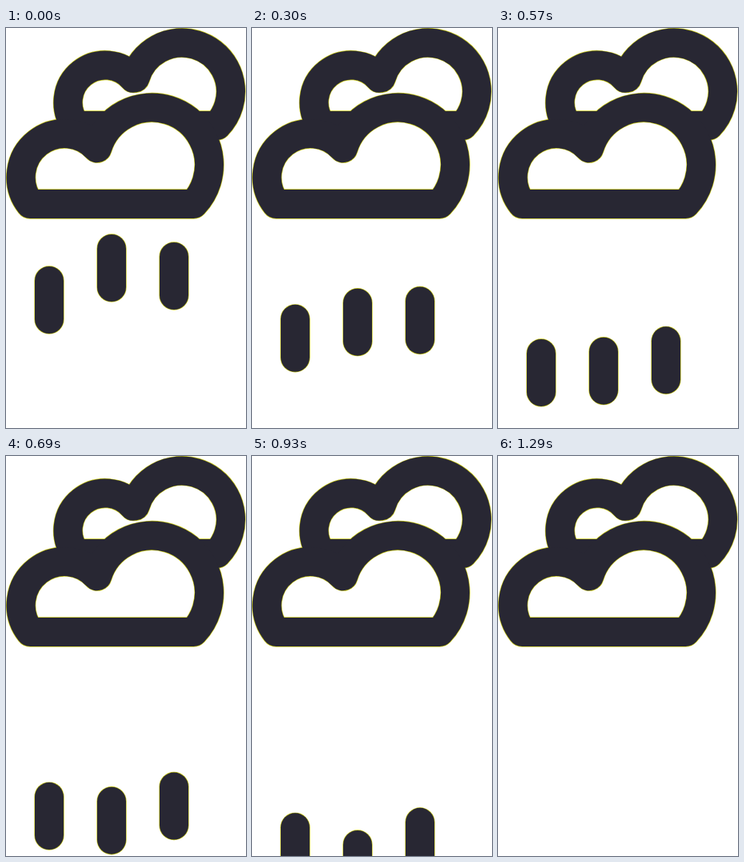
An HTML page with a canvas that plays this animation: 300 px wide and 500 px high, repeating every 1.35 s.

```html
<!DOCTYPE html>
<html>
<head>
<meta charset="utf-8">
<title>Rain clouds</title>
<style>
html, body { margin: 0; width: 100%; height: 100%; overflow: hidden; background: #fff; }
canvas { display: block; }
</style>
</head>
<body>
<canvas id="stage" width="300" height="500"></canvas>
<script>
const ctx = document.getElementById('stage').getContext('2d');
const INK = '#282733', FRINGE = '#c8c814';
const LOOP = 1350, STEP = 30, LAST = 1290;
ctx.lineCap = ctx.lineJoin = 'round';

// Two arcs meeting at a notch, closed by a flat base
function cloud([lx, ly, lr], [rx, ry, rr], [nx, ny], base) {
  const path = new Path2D();
  path.arc(lx, ly, lr, Math.PI - Math.asin((base - ly) / lr), Math.atan2(ny - ly, nx - lx) + 2 * Math.PI);
  path.arc(rx, ry, rr, Math.atan2(ny - ry, nx - rx) + 2 * Math.PI, Math.asin((base - ry) / rr) + 2 * Math.PI);
  path.closePath();
  return path;
}

const back = cloud([124, 93, 46.5], [220, 79.5, 61], [160, 62], 122);
const front = cloud([73.2, 186.5, 54.5], [182.5, 171, 71.5], [114, 150], 220);
const drops = [
  { x: 54, top: 298, speed: 0.1595 },
  { x: 132, top: 258, speed: 0.2257 },
  { x: 210, top: 268, speed: 0.1848 }
];

function outline(path, color, width) {
  ctx.strokeStyle = color;
  ctx.lineWidth = width;
  ctx.stroke(path);
}
const edge = path => outline(path, FRINGE, 37.3);
const body = path => outline(path, INK, 36);

function drawClouds() {
  edge(back);
  edge(front);
  body(back);
  ctx.save();
  ctx.clip(front);
  ctx.fillStyle = '#fff';
  ctx.fill(front);
  edge(front);
  ctx.restore();
  body(front);
}

function drawDrop({ x, top, speed }, t) {
  const y = top + speed * t + 18;
  const path = new Path2D();
  path.moveTo(x, y);
  path.lineTo(x, y + 48);
  edge(path);
  body(path);
}

function render() {
  const t = Math.min(Math.floor(performance.now() % LOOP / STEP) * STEP, LAST);
  ctx.fillStyle = '#fff';
  ctx.fillRect(0, 0, 300, 500);
  drawClouds();
  drops.forEach(drop => drawDrop(drop, t));
  requestAnimationFrame(render);
}
render();
</script>
</body>
</html>
```
